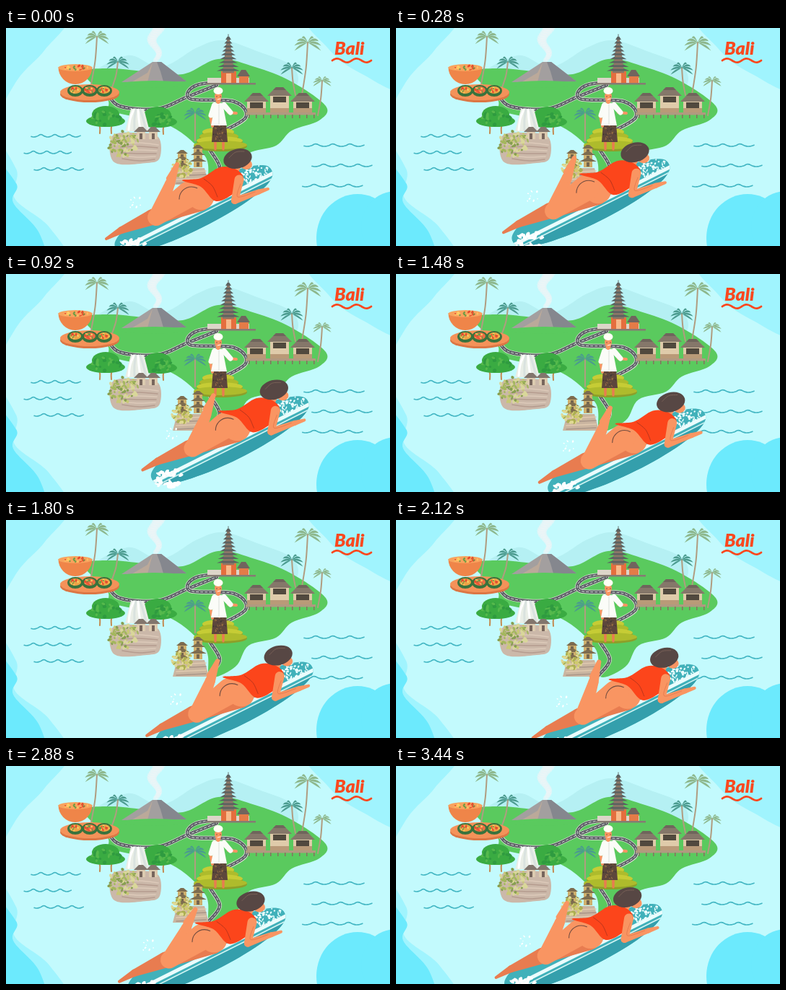
An HTML page with a canvas that plays this animation: 532 px wide and 302 px high, repeating every 3.56 s.

```html
<!DOCTYPE html>
<html lang="en">
<head>
<meta charset="utf-8">
<title>Bali surf map</title>
<style>
html, body { margin: 0; width: 100%; height: 100%; overflow: hidden; background: #c3fafd; }
canvas { display: block; width: 100%; height: 100%; }
</style>
</head>
<body>
<canvas id="stage"></canvas>
<script>
const W = 532, H = 302, LOOP = 3560, STEP = 40, LAST = 3440;
const { sin, cos, abs, sign, PI } = Math;
const scale = window.devicePixelRatio || 1;
const PALE = '#c3fafd', MID = '#a0f4fe', BRIGHT = '#6ceafd', LAND = '#5aca5e';
const SKIN = '#f99562', SHADE = '#e87c50', SUIT = '#fc451b', HAIR = '#574744';

function makeContext(canvas) {
  canvas.width = W * scale;
  canvas.height = H * scale;
  const ctx = canvas.getContext('2d');
  ctx.scale(scale, scale);
  ctx.lineCap = ctx.lineJoin = 'round';
  return ctx;
}

const canvas = document.getElementById('stage');
const screen = makeContext(canvas);
const backdrop = document.createElement('canvas');
let g = makeContext(backdrop);

function randomizer(seed) {
  return () => (seed = (seed * 16807) % 2147483647) / 2147483647;
}

// Smooth path through [x, y] points.
function curve(pts, closed) {
  const n = pts.length, path = new Path2D();
  const at = i => pts[closed ? (i + n) % n : Math.max(0, Math.min(n - 1, i))];
  path.moveTo(...pts[0]);
  for (let i = 0; i < (closed ? n : n - 1); i++) {
    const [a, b, c, d] = [at(i - 1), at(i), at(i + 1), at(i + 2)];
    path.bezierCurveTo(b[0] + (c[0] - a[0]) / 6, b[1] + (c[1] - a[1]) / 6,
      c[0] - (d[0] - b[0]) / 6, c[1] - (d[1] - b[1]) / 6, ...c);
  }
  return path;
}

function blob(color, ...pts) {
  g.fillStyle = color;
  g.fill(curve(pts, true));
}

function line(color, width, ...pts) {
  g.strokeStyle = color;
  g.lineWidth = width;
  g.stroke(curve(pts, false));
}

function poly(color, ...pts) {
  g.fillStyle = color;
  g.beginPath();
  for (const p of pts) g.lineTo(...p);
  g.fill();
}

function rect(color, x, y, w, h) {
  g.fillStyle = color;
  g.fillRect(x, y, w, h);
}

function oval(color, x, y, rx, ry = rx, angle = 0) {
  g.fillStyle = color;
  g.beginPath();
  g.ellipse(x, y, rx, ry, angle, 0, PI * 2);
  g.fill();
}

// Tapering rounded limb through [x, y, radius] joints.
function limb(color, ...joints) {
  g.fillStyle = color;
  joints.slice(1).forEach(([x2, y2, r2], i) => {
    const [x1, y1, r1] = joints[i];
    const a = Math.atan2(y2 - y1, x2 - x1);
    const lean = Math.acos((r1 - r2) / Math.hypot(x2 - x1, y2 - y1));
    g.beginPath();
    g.arc(x1, y1, r1, a + lean, a - lean);
    g.arc(x2, y2, r2, a - lean, a + lean);
    g.fill();
  });
}

// Random flecks inside an ellipse.
function flecks(seed, count, x, y, rx, ry, size, colors) {
  const rnd = randomizer(seed * 7919);
  for (let i = 0; i < count; i++) {
    const a = rnd() * PI * 2, r = Math.sqrt(rnd());
    oval(colors[i % colors.length], x + rx * r * cos(a), y + ry * r * sin(a), size * (0.5 + rnd()), size * (0.4 + rnd() * 0.6), rnd() * 3);
  }
}

function trapezoid(color, x, y, topHalf, bottomHalf, height) {
  poly(color, [x - topHalf, y], [x + topHalf, y], [x + bottomHalf, y + height], [x - bottomHalf, y + height]);
}

function palm(x, y, lean, height, size, color) {
  line('#b09c80', 2, [x, y], [x - lean * 0.3, y + height / 2], [x - lean, y + height]);
  for (let i = 0; i < 9; i++) {
    const a = PI * (0.92 + i * 0.145);
    const tip = [x + cos(a) * size, y + sin(a) * size * 0.8 + size * 0.4];
    const mid = [x + cos(a) * size * 0.65, y + sin(a) * size * 0.7 - size * 0.1];
    g.fillStyle = color;
    g.beginPath();
    g.moveTo(x, y);
    g.quadraticCurveTo(...mid, ...tip);
    g.quadraticCurveTo(mid[0], mid[1] + size * 0.35, x, y);
    g.fill();
  }
}

function wave(x, y, width) {
  const pts = Array.from({ length: 29 }, (_, i) => [x + width * i / 28, y - 2 + 4 * abs(sin(i / 28 * PI * 3.5 + 1))]);
  line('#42b6c3', 1.6, ...pts);
}

function drawWater() {
  rect(PALE, 0, 0, W, H);
  blob(MID, [-30, -30], [84, -20], [54, 30], [20, 66], [-30, 130]);
  blob(MID, [420, -20], [446, 28], [490, 62], [560, 85], [560, -30]);
  blob(MID, [-30, 150], [14, 195], [12, 236], [60, 276], [84, 330], [-30, 330]);
  blob(BRIGHT, [-30, 180], [14, 215], [10, 242], [46, 284], [50, 330], [-30, 330]);
  oval(BRIGHT, 487, 291, 57, 61);
  oval(BRIGHT, 540, 275, 48, 49);
  for (const [i, width] of [68, 65, 68].entries()) wave(35 + 10 * sin(i * 4.5), 149 + i * 23, width);
  for (let i = 0; i < 3; i++) wave(414 - 10 * sin(i * 4.5 + 0.1), 162 + i * 28, 83);
}

function drawLand() {
  blob('#b5f0f3', [118, 70], [168, 38], [215, 54], [265, 27], [300, 17], [345, 31], [400, 56], [380, 90], [200, 90]);
  blob(LAND, [108, 62], [145, 56], [190, 60], [245, 64], [294, 43], [345, 54], [395, 74], [443, 108], [434, 128],
    [396, 142], [374, 163], [336, 174], [318, 203], [283, 217], [276, 178], [228, 136], [150, 116], [140, 98]);
  const roads = [
    [[140, 88], [157, 108], [210, 112], [250, 96], [292, 79]],
    [[330, 72], [265, 79], [255, 98], [316, 102], [332, 124], [290, 149], [280, 163], [296, 193], [281, 215]]
  ];
  for (const road of roads) {
    line('#e3eadb', 6, ...road);
    line('#5d6066', 4.6, ...road);
    g.setLineDash([3, 3]);
    line('#ffffff', 0.8, ...road);
    g.setLineDash([]);
  }
}

function drawVolcano() {
  for (let i = 0; i < 16; i++) oval('rgba(240,244,246,.55)', 207 + 5 * sin(i * 0.5), 45 - i * 3, 3 + i * 0.4, 4);
  poly('#a39f9f', [160, 75], [203, 47], [215, 47], [250, 74]);
  poly('#85878e', [209, 47], [215, 47], [250, 74], [218, 74], [214, 60]);
  poly('#bba99a', [203, 48], [196, 62], [174, 75], [196, 75]);
  oval(LAND, 205, 78, 47, 5);
}

function drawFood() {
  const toppings = ['#e84c30', '#ffcc64', '#6a9d45'];
  g.fillStyle = '#ef8549';
  g.beginPath();
  g.ellipse(96, 54, 23.5, 24, 0, 0, PI);
  g.fill();
  oval('#f8a35e', 96, 55, 23.5, 5);
  flecks(3, 24, 96, 55, 19, 3, 1.6, toppings);
  oval('#dc7644', 116, 92, 41, 11);
  oval('#f49259', 116, 89, 41, 11);
  for (let i = 0; i < 3; i++) {
    const x = 96 + i * 20;
    oval('#39733d', x, 87, 11, 8);
    oval(i === 1 ? '#ef6d43' : '#eda446', x, 86, 8, 5);
    flecks(8 + i, 14, x, 86, 7, 4, 1.5, toppings);
  }
}

function drawPagoda() {
  rect('#ddd5c9', 279, 69, 58, 8);
  rect('#e56e3e', 298, 60, 21, 16);
  rect('#f7b98a', 305, 63, 7, 13);
  line('#5c6261', 1, [308, 9], [308, 16]);
  for (let i = 8; i >= 0; i--) {
    const half = 4 + i * 1.5, y = 12 + i * 5.4;
    rect('#8b7767', 308 - half / 2, y + 3, half, 4);
    trapezoid('#5c6261', 308, y, half * 0.35, half, 4.2);
  }
  rect('#e47b48', 323, 67, 13, 9);
  trapezoid('#71645e', 329, 58, 3, 9, 9);
  rect('#867b73', 277, 76, 69, 2.5);
}

function drawHuts() {
  rect('#b09a80', 332, 117, 97, 3.5);
  for (let x = 336; x < 428; x += 10) rect('#85715f', x, 120, 1.5, 5);
  for (let i = 0; i < 3; i++) {
    const x = 347 + i * 32, y = i === 1 ? 82 : 90;
    rect('#dfcbaa', x - 13, y + 11, 26, 117 - y - 11);
    rect('#51493e', x - 9, y + 13, 18, 8);
    rect('#b99a78', x - 13, 111, 26, 6);
    trapezoid('#85776a', x, y, 5, 17, 12);
    trapezoid('#6f655c', x, y, 5, 9, 4);
  }
}

function drawFalls() {
  for (const [x, y] of [[138, 125], [210, 126]]) {
    for (const dx of [-8, 8]) line('#c48a50', 2, [x + dx * 1.5, y + 5], [x + dx, y + 12], [x + dx, y + 21]);
    oval('#3aab42', x, y - 5, 19, 12);
    oval('#3aab42', x, y + 4, 27, 8);
    flecks(x, 22, x, y, 23, 9, 3, ['#55b94c', '#2f9b40']);
  }
  trapezoid('#e9eee6', 182, 112, 9, 17, 31);
  for (let i = 0; i < 4; i++) line(i % 2 ? '#d9e2df' : '#ffffff', 3, [177 + i * 3, 113], [172 + i * 6, 126], [170 + i * 8, 141]);
  blob('#cbb8a9', [147, 150], [180, 145], [211, 151], [213, 180], [195, 187], [150, 186]);
  for (let i = 0; i < 6; i++) line(i % 2 ? '#b59c8f' : '#ddcaba', 1.6, [156 + i, 161 + i * 4], [185, 159 + i * 5], [211 - i, 162 + i * 4]);
  for (const x of [187, 204]) {
    rect('#dccbb0', x - 6, 143, 12, 11);
    rect('#77665d', x - 2, 146, 4, 8);
    trapezoid('#82766d', x, 137, 3, 10, 7);
  }
  flecks(41, 75, 163, 160, 21, 18, 2.4, ['#c7c976', '#a4b75d', '#d9d79a', '#879f50']);
}

function drawTerrace() {
  for (let i = 0; i < 4; i++) {
    const y = 144 + i * 6, half = 22 + i * 5;
    oval('#8d9f28', 294 + i, y + 2, half, 7);
    oval(i % 2 ? '#aebb2c' : '#c6cc35', 294 + i, y, half, 6);
  }
}

function drawMan() {
  for (const x of [290, 301]) limb(SHADE, [x, 155, 2], [x, 168, 1.6]);
  trapezoid('#5d463c', 296, 132, 9, 11, 26);
  flecks(12, 26, 296, 145, 9, 11, 1.2, ['#a87748', '#3c3833', '#80623c']);
  limb(SKIN, [308, 117, 2], [319, 118, 2]);
  limb(SKIN, [283, 122, 2], [286, 136, 2]);
  trapezoid('#fbfcf8', 295, 104, 5, 11, 31);
  limb('#fbfcf8', [302, 107, 4], [311, 117, 3.5]);
  limb('#fbfcf8', [289, 107, 4], [284, 121, 3.5]);
  line('#d9ded8', 1, [295, 106], [295, 134]);
  limb(SKIN, [294, 94, 5], [294, 102, 3]);
  oval('#fffff4', 294, 87, 6.5, 5);
  for (const x of [292, 297]) oval('#5b463d', x, 95, 0.7);
  line('#ffffff', 1, [293, 99], [297, 98]);
}

function drawTemple() {
  for (const [x, y] of [[244, 169], [266, 162]]) {
    for (let i = 0; i < 3; i++) {
      rect('#ceb06d', x - 6, y + 4 + i * 9, 12, 9);
      rect('#746550', x - 2, y + 6 + i * 9, 4, 6);
      trapezoid('#7d6c4f', x, y + i * 9, 2, 8 + i * 2, 5);
    }
  }
  trapezoid('#cab5a0', 256, 194, 19, 25, 23);
  for (let i = 0; i < 4; i++) line(i % 2 ? '#aa9688' : '#e0cab0', 1.6, [236, 200 + i * 5], [277, 198 + i * 5]);
  flecks(66, 62, 244, 194, 14, 14, 2.2, ['#d0cb6d', '#acaf52', '#e0d995']);
}

function drawTitle() {
  g.fillStyle = '#fa481e';
  g.font = 'italic 900 25px Lato, sans-serif';
  g.fillText('Bali', 455, 37);
  const pts = Array.from({ length: 19 }, (_, i) => [452 + i * 3, 45 - 2.6 * sin(i / 18 * PI * 4)]);
  line('#fa481e', 2.8, ...pts);
}

function drawScenery() {
  drawWater();
  drawLand();
  drawVolcano();
  for (const [x, y, lean, height, size] of [[126, 12, 8, 66, 17], [418, 20, 8, 72, 19], [438, 73, 6, 48, 13]]) {
    palm(x, y, lean, height, size, '#8db78c');
  }
  for (const [x, y, lean] of [[155, 47, 9], [396, 55, -5], [262, 118, 0]]) palm(x, y, lean, 38, 16, '#4b9b8f');
  drawFood();
  drawPagoda();
  drawHuts();
  drawFalls();
  drawTerrace();
  drawMan();
  drawTemple();
  drawTitle();
}

// Board in its own axes: nose at +x, near rail at +y.
function drawBoard() {
  const length = 121, width = 28;
  const outline = Array.from({ length: 40 }, (_, i) => {
    const a = i / 20 * PI;
    return [length * cos(a), width * sign(sin(a)) * abs(sin(a)) ** 0.85];
  });
  g.save();
  g.translate(260, 251);
  g.rotate(-0.463);
  g.save();
  g.clip(curve(outline, true));
  rect('#41b1ba', -length, -width, length * 2, width * 2);
  rect('#349fac', -length, 12, length * 2, width);
  rect('#eafcfc', -length, 2, length * 2, 5);
  rect('#d9f6f5', -length, 10, length * 2, 1.5);
  flecks(37, 60, 97, -7, 20, 11, 1.6, ['#eaffff']);
  g.restore();
  flecks(53, 34, -100, 10, 20, 14, 3, ['#ffffff']);
  flecks(55, 8, -68, -45, 14, 8, 1.3, ['#ffffff']);
  g.restore();
}

function drawBody(kick) {
  const knee = [208, 262];
  limb(SHADE, [268, 240, 14], [203, 262, 11], [160, 280, 5], [139, 292, 2]);
  oval(SKIN, 270, 235, 18, 17);
  g.save();
  g.translate(...knee);
  g.rotate(kick);
  limb(SKIN, [0, 0, 11], [19, -46, 7], [29, -73, 3]);
  limb(SKIN, [17, -54, 3], [29, -73, 3]);
  g.restore();
  limb(SKIN, [254, 230, 18], [...knee, 12]);
  g.strokeStyle = '#714c40';
  g.lineWidth = 1.1;
  g.beginPath();
  g.arc(257, 237, 17, PI, PI * 1.65);
  g.stroke();
  limb(SKIN, [311, 202, 9], [321, 188, 6]);
  blob(SUIT, [244, 211], [270, 208], [296, 193], [317, 195], [329, 208], [318, 227], [291, 240], [270, 220]);
  line('#ba351c', 1, [274, 209], [286, 219], [293, 234]);
  limb(SKIN, [323, 210, 6.5], [317, 239, 5], [350, 227, 3.5], [363, 223, 2]);
  line(SHADE, 1, [325, 216], [321, 234], [345, 227]);
  oval(SKIN, 333, 189, 8, 7);
  oval(HAIR, 321, 181, 20, 13.5, -0.25);
  line('#786057', 1, [309, 180], [318, 172], [330, 171]);
}

// Slow drift around a lopsided ring, with the raised calf swinging back on the way down.
function pose(t) {
  const p = t / (LAST + STEP) * PI * 2;
  const once = 1 - cos(p), twice = 1 - cos(2 * p);
  return {
    x: 28.5 * once + 6 * twice + 7.4 * sin(p),
    y: 2.6 * once - 4.7 * twice - 14.2 * sin(p),
    kick: -0.14 * Math.max(0, -sin(p)) * sin(2 * p)
  };
}

drawScenery();
g = screen;
const start = performance.now();

function frame() {
  const elapsed = (performance.now() - start) % LOOP;
  const { x, y, kick } = pose(Math.min(LAST, Math.floor(elapsed / STEP) * STEP));
  g.drawImage(backdrop, 0, 0, W, H);
  g.save();
  g.translate(x, y);
  drawBoard();
  drawBody(kick);
  g.restore();
  requestAnimationFrame(frame);
}
frame();
</script>
</body>
</html>
```
